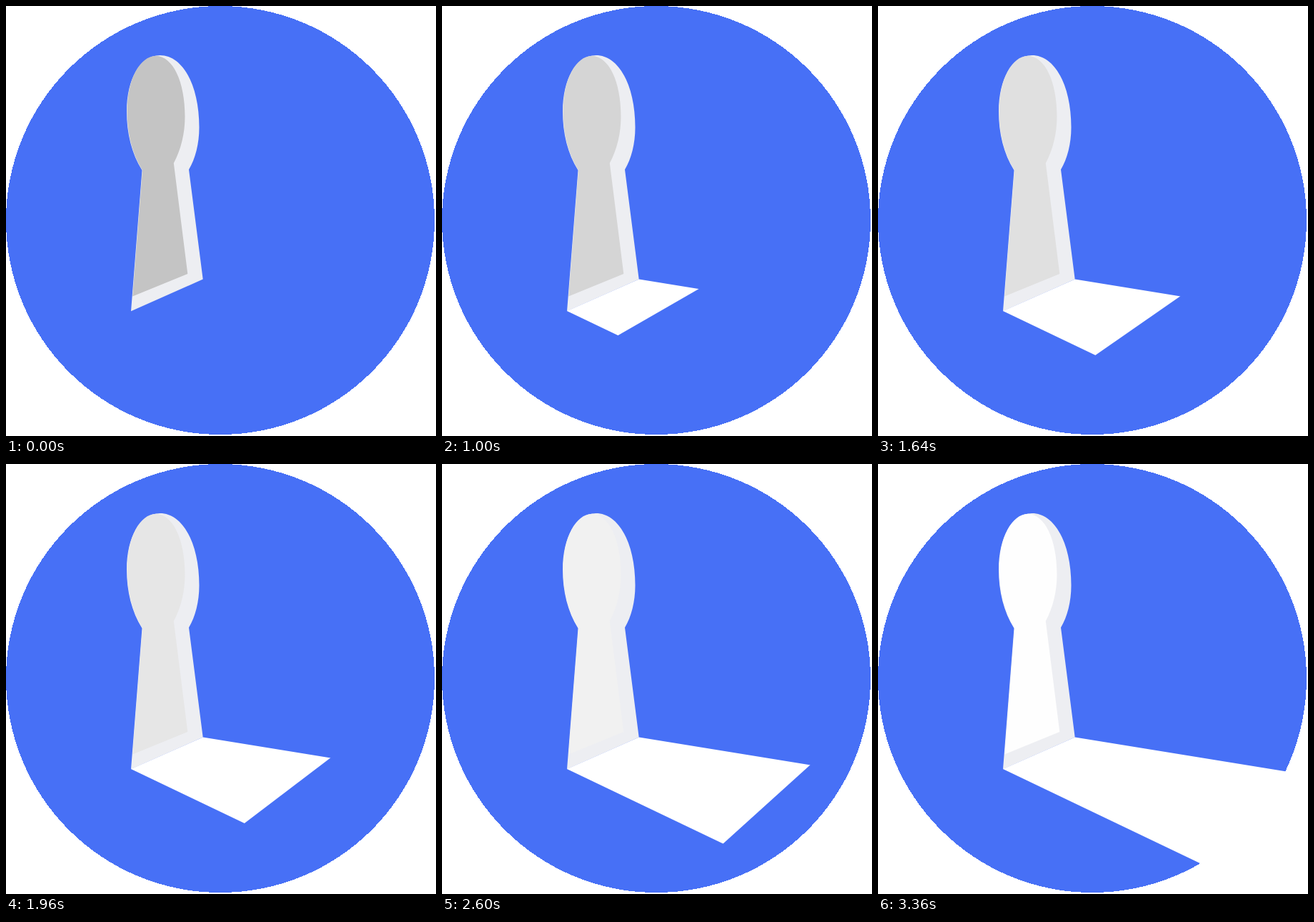
An HTML page without scripts that plays this animation: 602x602 px, repeating every 5 s.

```html
<!DOCTYPE html>
<html lang="en">
<head>
<meta charset="utf-8">
<title>Light through a keyhole</title>
<style>
  html, body { margin: 0; width: 100%; height: 100%; overflow: hidden; background: #fff; }
  svg { display: block; width: 100%; height: 100%; }

  .wall { fill: #4770f6; shape-rendering: crispEdges; }
  .rim { fill: #edeef2; }
  .hole { animation: brighten 5s linear infinite; }
  .beam { fill: #fff; animation: sweep 5s linear infinite; }

  @keyframes brighten {
    0% { fill: #c4c4c4; }
    68%, 100% { fill: #fff; }
  }

  /* The far edge of the light slides outward while it turns. */
  @keyframes sweep {
    0% { transform: translate(207.5px, 399px) rotate(-22.3deg); }
    68%, 100% { transform: translate(529.5px, 501px) rotate(-48.2deg); }
  }
</style>
</head>
<body>
<svg viewBox="0 0 602 602">
  <defs>
    <clipPath id="floor">
      <path d="M175 427 L275.7 382.6 L647 442.8 L523 593.5 Z"/>
    </clipPath>
  </defs>

  <circle class="wall" cx="300" cy="300" r="300"/>

  <path class="rim" d="M175 427.3 L190.5 230
    C176 207 169 178 169 148 C169 102 188 69 215.5 69
    C248 69 270.5 112 270.5 170 C270.5 193 265 214 256 229
    L275.7 382.6 Z"/>

  <path class="hole" d="M177.2 406.5 L191 230
    C176.6 207 169.6 178 169.6 148 C169.6 103 187 70.5 210 69.8
    C234 71 250.5 106 250.5 155 C250.5 178 245 201 234.8 220
    L254.3 375 Z"/>

  <g clip-path="url(#floor)">
    <rect class="beam" x="-400" y="-600" width="800" height="600"/>
  </g>
</svg>
</body>
</html>
```
